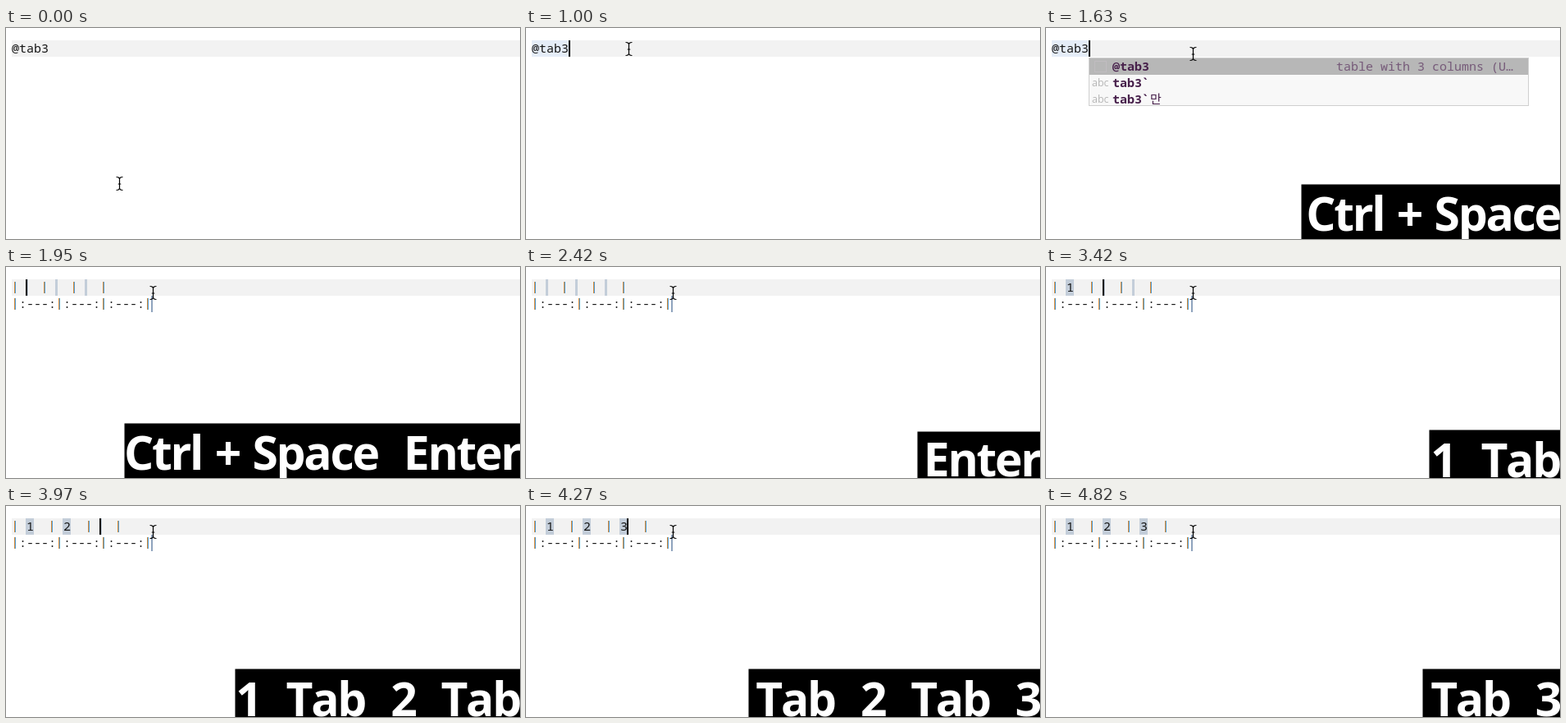
These frames come from a looping animation (627 by 257 pixels, 4900 ms). An HTML page:

```html
<!DOCTYPE html>
<html lang="en">
<head>
<meta charset="utf-8">
<title>Table snippet in an editor</title>
<style>
  html, body { margin: 0; width: 100%; height: 100%; overflow: hidden; background: #fff; }
  svg { display: block; width: 627px; height: 257px; }
  text { white-space: pre; }
  .code { font: 500 15px "Noto Sans Mono", "DejaVu Sans Mono", monospace; fill: #161616; }
  .bold { font-weight: 700; fill: #47204b; }
  .detail { font-weight: 400; fill: #765a79; }
  .icon { font: 12.5px "Open Sans", sans-serif; fill: #b5b5b5; }
  .hangul { font: 300 15px "Noto Sans CJK KR", "Noto Sans CJK", sans-serif; fill: #47204b; }
  .key {
    font: 700 57px "Open Sans", "Noto Sans", sans-serif; font-kerning: none;
    letter-spacing: -2.3px; word-spacing: 3px; text-anchor: end; fill: #fff;
  }
</style>
</head>
<body>
<svg viewBox="0 0 627 257">
  <rect x="7" y="15" width="620" height="20" fill="#f2f2f2"/>
  <g id="marks"></g>
  <text id="row1" class="code" x="7" y="30"></text>
  <text id="row2" class="code" x="7" y="50"></text>
  <g id="pipes"></g>
  <rect id="caret" y="15" width="2" height="20"/>
  <g id="popup">
    <rect x="52.5" y="36.5" width="536" height="58" fill="#f8f8f8" stroke="#cfcfcf"/>
    <rect x="53" y="37" width="535" height="20" fill="#b7b7b7"/>
    <rect x="59.5" y="40.5" width="14" height="13" fill="none" stroke="#c0bcc0"/>
    <text class="code bold" x="81" y="52">@tab3</text>
    <text class="code detail" x="354" y="52">table with 3 columns (U…</text>
    <text class="icon" x="56" y="71">abc</text>
    <text class="code bold" x="81" y="72">tab3`</text>
    <text class="icon" x="56" y="91">abc</text>
    <text class="code bold" x="81" y="92">tab3`</text>
    <text class="hangul" x="127" y="92" lang="ko">만</text>
  </g>
  <g id="keys"></g>
  <path id="mouse" fill="none" stroke="#000" stroke-width="1.2" stroke-linecap="round"
    d="M-3.5-8Q-.7-8 0-6Q.7-8 3.5-8M0-6V6M-3.5 8Q-.7 8 0 6Q.7 8 3.5 8M-1.3 .5H1.3"/>
</svg>
<script>
const LOOP = 4900, COL = 9, LEFT = 7, STAGE = 627;
const $ = id => document.getElementById(id);

// Pointer positions: [time, x, y]
const pointer = [
  [0, 138, 189.5], [70, 132, 178], [150, 117, 148], [230, 97, 108], [300, 82, 72],
  [380, 77, 48], [460, 84, 36], [530, 106, 32], [620, 135, 19.5], [710, 125, 25.5],
  [1080, 152, 28], [1160, 179, 31.5]
];

// Caret columns: [time, column], null while hidden
const caret = [
  [0, null], [620, 5], [1160, null], [1630, 5], [1950, 2], [2420, null], [2880, 2],
  [3110, 3], [3420, 7], [3740, 8], [3970, 12], [4270, 13], [4820, null]
];

// Key presses: [label, shown from, shown until]
const presses = [
  ["Ctrl + Space", 1080, 2020], ["Enter", 1950, 2880], ["1", 3110, 4040],
  ["Tab", 3420, 4350], ["2", 3740, 4670], ["Tab", 3970, LOOP], ["3", 4270, LOOP]
];
// Key sizes: step to the next key, and room taken when last
const sizes = { "Ctrl + Space": [333, 316], Enter: [166, 150], Tab: [126, 98] };
const digit = [62, 42];

const at = (list, t) => list.filter(s => s[0] <= t).pop();
const rect = (x, y, w, h, fill) =>
  `<rect x="${x}" y="${y}" width="${w}" height="${h}" fill="${fill}"/>`;

// A pipe is a thin stem with a warm left and a cool right fringe
const pipes = (line, y) => [...line].map((c, i) => {
  const x = LEFT + i * COL + 3;
  return c === "|" ? rect(x, y, 1, 14, "#d98a35") + rect(x + 1, y, 1, 14, "#4f9fdb") : "";
}).join("");

function drawTable(t) {
  const cells = [[3110, "1"], [3740, "2"], [4270, "3"]].map(([from, s]) => t >= from ? s : "");
  let line = "|", marks = "";
  for (const cell of cells) {
    const x = LEFT + (line.length + 1) * COL - 1;
    marks += rect(x, 15, cell ? 10 : 3, 20, "#c3cdd9");
    line += ` ${cell}  |`;
  }
  marks += rect(177, 35, 2, 20, "#8fa3bd");
  return [line, "|:---:|:---:|:---:|", marks];
}

function drawKeys(t) {
  const shown = presses.filter(p => t >= p[1] && t < p[2]).map(p => p[0]);
  if (!shown.length) return "";
  const size = k => sizes[k] || digit, last = shown.length - 1;
  const left = shown.reduce((x, k, i) => x - size(k)[i === last ? 1 : 0], STAGE + .5);
  // The caption sits on its lowest ink, so descenders lift it
  const base = shown[0] === "Ctrl + Space" ? 247 : shown[0] === "Enter" ? 255 : 256;
  const top = base === 247 ? 190.5 : base === 255 ? 200.5 : 198.5;
  return rect(left, top, STAGE - left, 257 - top, "#000") +
    `<text class="key" x="${STAGE}" y="${base}">${shown.join("  ")}</text>`;
}

function put(id, html) {
  const el = $(id);
  if (el.shown !== html) el.innerHTML = el.shown = html;
}

function draw(t) {
  const [row1, row2, marks] = t >= 1950 ? drawTable(t)
    : ["@tab3", "", t >= 1000 ? rect(7, 15, 45, 20, "#e5edf8") : ""];
  put("marks", marks);
  put("row1", row1.replaceAll("|", " "));
  put("row2", row2.replaceAll("|", " "));
  put("pipes", pipes(row1, 18) + pipes(row2, 38));
  put("keys", drawKeys(t));
  $("popup").style.display = t >= 1160 && t < 1950 ? "" : "none";

  const col = at(caret, t)[1];
  $("caret").style.display = col === null ? "none" : "";
  $("caret").setAttribute("x", LEFT + (col || 0) * COL - (t < 1950 ? 0 : 1));

  const [, x, y] = at(pointer, t);
  $("mouse").setAttribute("transform", `translate(${x + .5} ${y})`);
}

const start = performance.now();
function tick() {
  draw((performance.now() - start) % LOOP);
  requestAnimationFrame(tick);
}
draw(0);
requestAnimationFrame(tick);
</script>
</body>
</html>
```
